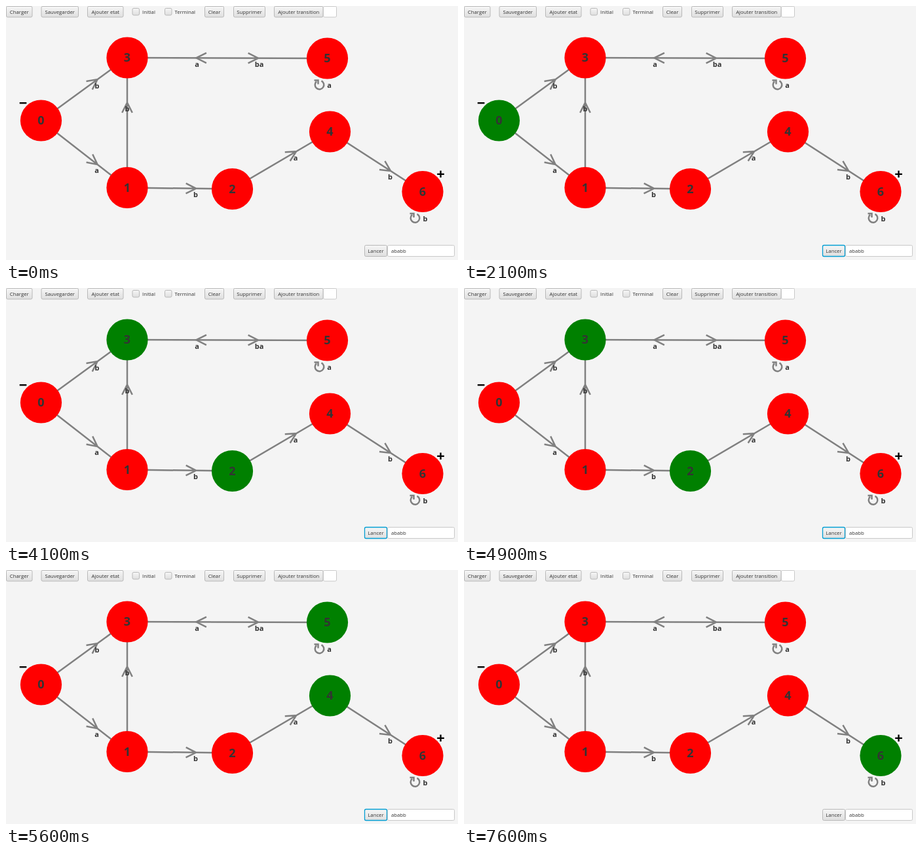
An HTML page for the animation above (8.7 s loop, 690 by 388 pixels).

```html
<!DOCTYPE html>
<html lang="fr">
<head>
<meta charset="utf-8">
<style>
  html, body { margin: 0; width: 100%; height: 100%; overflow: hidden; background: #f4f4f4; }
  svg { display: block; width: 690px; height: 388px; }
  text { font: 7.75px "Open Sans", "Noto Sans", sans-serif; fill: #333; }
  .mid { text-anchor: middle; }
  .label { font-size: 11px; font-weight: 700; }
  .state { font-size: 18px; font-weight: 700; }
  .mark { font-size: 22px; font-weight: 700; fill: #000; }
  .edge { fill: none; stroke: #808080; stroke-width: 2.5; }
  .button { fill: url(#face); stroke: #b8b8b8; }
  .field { fill: #fff; stroke: #c8c8c8; }
  .focus { stroke: #039ed3; stroke-width: 1.3; }
  .pressed { fill: #d8d8d8; }
</style>
</head>
<body>
<svg id="stage" viewBox="0 0 690 388">
  <defs>
    <linearGradient id="face" x2="0" y2="1">
      <stop offset="0" stop-color="#f6f6f6"/>
      <stop offset="1" stop-color="#dfdfdf"/>
    </linearGradient>
  </defs>
</svg>
<script>
const LOOP = 8700;
const stage = document.getElementById('stage');

function add(tag, attrs, content = '') {
  const el = document.createElementNS('http://www.w3.org/2000/svg', tag);
  for (const key in attrs) el.setAttribute(key, attrs[key]);
  el.textContent = content;
  return stage.appendChild(el);
}
const text = (x, y, content, cls = '') => add('text', { x, y, class: cls }, content);
const box = (x, y, width, height, cls) => add('rect', { x, y, width, height, rx: 2, class: cls });

function button(left, right, top, height, name) {
  const face = box(left + .5, top + .5, right - left - 1, height - 1, 'button');
  text((left + right) / 2, top + height / 2 + 2.9, name, 'mid');
  return face;
}

// Toolbar
[[0, 40.5, 'Charger'], [53.5, 111, 'Sauvegarder'], [124, 179.5, 'Ajouter etat'],
 [303, 333, 'Clear'], [347, 396, 'Supprimer'], [409, 484.5, 'Ajouter transition']]
  .forEach(([left, right, name]) => button(left, right, 0, 17.5, name));
[[193, 'Initial'], [242.5, 'Terminal']].forEach(([x, name]) => {
  box(x, 3.5, 10.5, 10.5, 'button');
  text(x + 15, 11.6, name);
});
box(484.5, .5, 20, 16.5, 'field');

// Run bar
const run = button(547, 582, 365, 18, 'Lancer');
box(582.5, 365.5, 102, 17, 'field');
text(588, 377, 'ababb');

// Automaton
const states = [[53.5, 175], [185, 277.5], [345.5, 279.5], [185, 79],
                [494.5, 192], [490.5, 80], [636, 283.5]];
const edges = [[0, 3], [0, 1], [1, 3], [1, 2], [2, 4], [4, 6], [3, 5], [5, 3]];

for (const [from, to] of edges) {
  const [x, y] = states[from];
  const dx = states[to][0] - x, dy = states[to][1] - y;
  const length = Math.hypot(dx, dy), tip = length * .655;
  const angle = Math.atan2(dy, dx) * 180 / Math.PI;
  // Opposite transitions share a single line.
  const line = from === 5 ? '' : `M0 0H${length}`;
  add('path', {
    class: 'edge',
    transform: `translate(${x} ${y}) rotate(${angle})`,
    d: `${line}M${tip - 15.5} -7.8L${tip} 0L${tip - 15.5} 7.8`
  });
}

const discs = states.map(([cx, cy], i) => {
  const disc = add('circle', { cx, cy, r: 31.6 });
  text(cx, cy + 6.3, i, 'state mid');
  return disc;
});

[[478.5, 120.5], [624.5, 324]].forEach(([x, y]) => add('path', {
  class: 'edge',
  transform: `translate(${x} ${y})`,
  d: 'M3 -6.2A6.8 6.8 0 1 1 -4.5 -5.2M-8 -7H-2V-1'
}));

[[139, 125.5, 'b'], [138.5, 255, 'a'], [185, 161, 'b'], [289.5, 291.5, 'b'],
 [442, 236, 'a'], [586.5, 264.5, 'b'], [291.5, 92.5, 'a'], [386.5, 92.5, 'ba'],
 [493.5, 125, 'a'], [640, 328.5, 'b']]
  .forEach(([x, y, name]) => text(x, y, name, 'label mid'));
text(26, 155.5, '−', 'mark mid');
text(663.5, 264, '+', 'mark mid');

// Active states while the word is being read
const steps = [[0, []], [2000, [0]], [3000, [1]], [4100, [2, 3]], [5000, [4, 5]], [6100, [6]]];

function draw(now) {
  const t = now % LOOP;
  const active = steps.findLast(([start]) => t >= start)[1];
  discs.forEach((disc, i) => disc.setAttribute('fill', active.includes(i) ? '#008000' : '#f00'));
  run.classList.toggle('focus', t >= 600 && t < 7600);
  run.classList.toggle('pressed', t >= 2000 && t < 2100);
  requestAnimationFrame(() => draw(performance.now() - origin));
}
const origin = performance.now();
draw(0);
</script>
</body>
</html>
```
